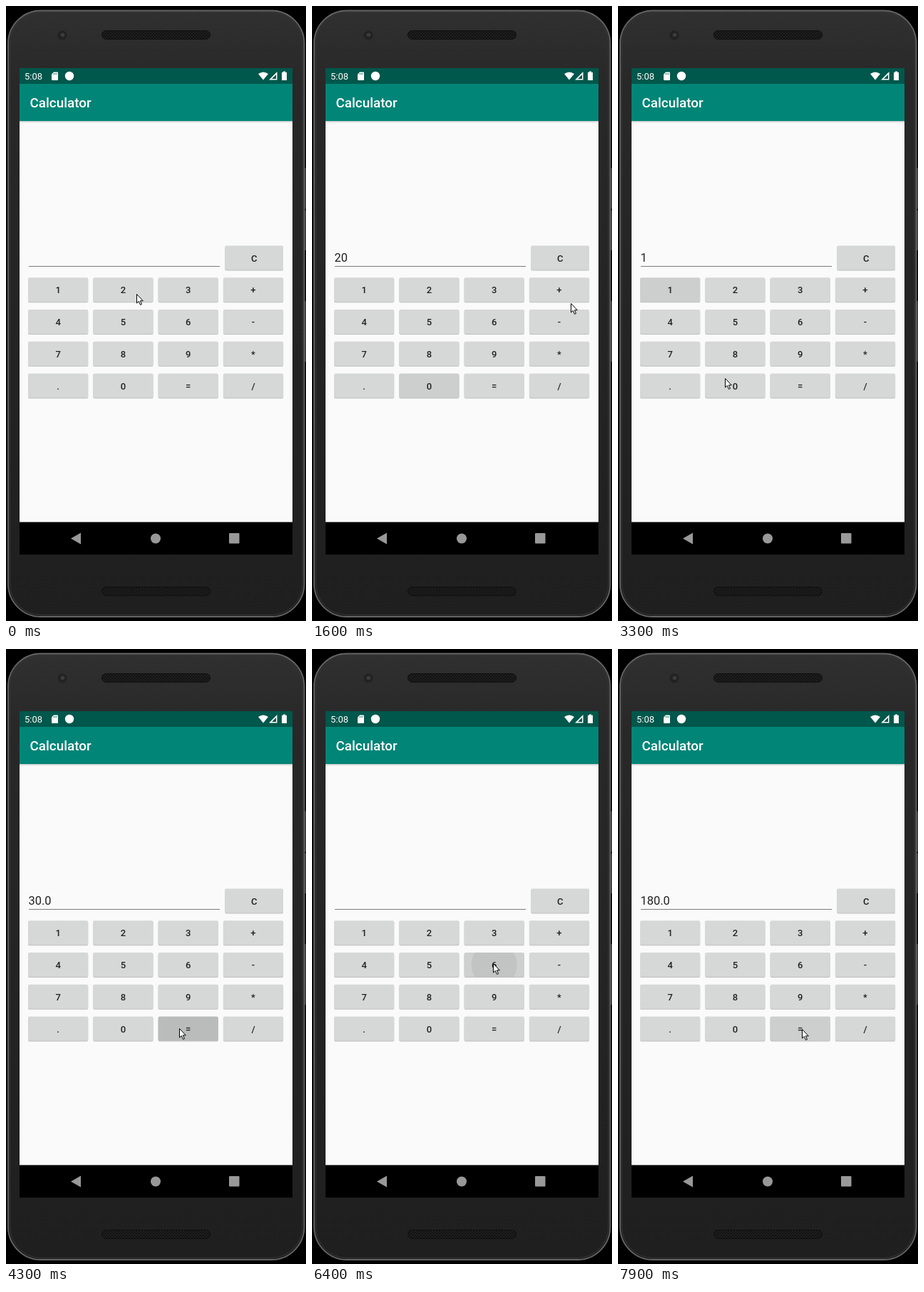
An HTML page for the animation above (8 s loop, 421 by 861 pixels).

```html
<!DOCTYPE html>
<html lang="en">
<head>
<meta charset="utf-8">
<title>Calculator</title>
<style>
  html, body { margin: 0; width: 421px; height: 861px; overflow: hidden; background: #000; }
  svg { display: block; font-family: Roboto, sans-serif; }
  .key { fill: #d6d7d7; filter: drop-shadow(0 1px .7px rgba(0, 0, 0, .24)); }
  .label { font-size: 13px; font-weight: 500; fill: #212121; text-anchor: middle; }
</style>
</head>
<body>
<svg width="421" height="861" viewBox="0 0 421 861">
  <defs>
    <linearGradient id="body" x1="0" y1="0" x2="0" y2="1">
      <stop offset="0" stop-color="#303031"/>
      <stop offset=".12" stop-color="#282829"/>
      <stop offset="1" stop-color="#1f1f20"/>
    </linearGradient>
    <linearGradient id="shade" x1="0" y1="0" x2="0" y2="1">
      <stop offset="0" stop-color="#000" stop-opacity=".2"/>
      <stop offset="1" stop-color="#000" stop-opacity="0"/>
    </linearGradient>
    <pattern id="mesh" width="4" height="4" patternUnits="userSpaceOnUse">
      <rect width="4" height="4" fill="#1f1f20"/>
      <circle cx="1" cy="1" r="1" fill="#0d0d0d"/>
      <circle cx="3" cy="3" r="1" fill="#0d0d0d"/>
    </pattern>
  </defs>

  <!-- phone -->
  <path d="M418 227h3v57h-3zM418 286h3v56h-3zM418 413h3v85h-3z" fill="#3a3a3b"/>
  <rect x="3" y="6.500" width="415.500" height="848.500" rx="46" fill="url(#body)" stroke="#656566" stroke-width="1.800"/>
  <rect x="5.500" y="9" width="410.500" height="843.500" rx="43.500" fill="none" stroke="#363637"/>
  <g fill="url(#mesh)" stroke="#0f0f10">
    <rect x="134.500" y="34.500" width="152" height="12" rx="6"/>
    <rect x="134.500" y="813.500" width="152" height="12" rx="6"/>
  </g>
  <circle cx="79" cy="41" r="6.500" fill="#222223"/>
  <circle cx="79.500" cy="40.500" r="2.800" fill="#3c3c3e"/>

  <!-- app -->
  <rect x="19" y="87" width="383" height="681" fill="#fafafa"/>
  <rect x="19" y="87" width="383" height="22" fill="#00574b"/>
  <rect x="19" y="109" width="383" height="52" fill="#008577"/>
  <rect x="19" y="161" width="383" height="3" fill="url(#shade)"/>
  <g fill="#fff">
    <text x="26" y="103" font-size="13">5:08</text>
    <text x="33.500" y="142" font-size="18.85" font-weight="500">Calculator</text>
    <path d="M67 92.500h5q1 0 1 1v9.500q0 1-1 1h-7q-1 0-1-1v-7.500z"/>
    <circle cx="89" cy="98" r="6.200"/>
    <path d="M354 95q7-5 14 0l-7 8.500z"/>
    <path d="M380.500 92v11.500h-11.500zM379 96l-6 6h6z" fill-rule="evenodd"/>
    <path d="M389 91.500h3v1.300h2v11.200h-7v-11.200h2z"/>
  </g>
  <path d="M67 94v2M69 94v2M71 94v2" stroke="#00574b" stroke-width=".8"/>
  <rect x="32" y="364" width="268" height="1" fill="#7c7c7c"/>
  <text id="display" x="31.500" y="358" font-size="16.4" fill="#212121"></text>
  <g id="keys"></g>

  <!-- navigation -->
  <rect x="19" y="722.500" width="383" height="45.500" fill="#000"/>
  <g fill="#999">
    <path d="M91 745.500l14-8v16z"/>
    <circle cx="210" cy="745.500" r="7"/>
    <rect x="313" y="738" width="14.500" height="14.500" rx="1"/>
  </g>

  <path id="cursor" d="M.5.5v12.500l2.800-2.600 2.200 5 2-.9-2.100-4.700h3.900z"
        fill="#fff" stroke="#000" stroke-linejoin="round"/>
</svg>
<script>
const LOOP = 8000, TICK = 100;
const KEY_H = 34, RIPPLE = 32;

// time in ticks, key
const taps = [
  [6, '2'], [14, '0'], [20, '+'], [31, '1'], [36, '0'],
  [42.5, '='], [53.5, '*'], [64, '6'], [77, '=']
];

// pointer legs: start tick, end tick, x and y reached
const home = { x: 183, y: 403 };
const legs = [
  [0, 2, 177, 400], [7, 9, 175, 524], [15, 16, 363, 416], [16, 18, 345, 398],
  [21, 24, 217, 406], [26, 28, 85, 397], [32, 33, 150, 521], [38, 40, 243, 531],
  [44, 46, 276, 565], [47, 52, 338, 483], [55, 56, 258, 472], [57, 60, 219, 419],
  [60, 62, 254, 440], [65, 68, 258, 540], [69, 70, 258, 532]
];

const $ = id => document.getElementById(id);
const clamp = v => Math.min(1, Math.max(0, v));
const ease = v => v * v * (3 - 2 * v);
const operate = {
  '+': (a, b) => a + b,
  '-': (a, b) => a - b,
  '*': (a, b) => a * b,
  '/': (a, b) => a / b
};
const keys = {};

function add(parent, tag, attrs) {
  const el = document.createElementNS('http://www.w3.org/2000/svg', tag);
  for (const name in attrs) el.setAttribute(name, attrs[name]);
  return parent.appendChild(el);
}

function addKey(label, x, y, w) {
  const g = add($('keys'), 'g', { transform: `translate(${x} ${y})` });
  const box = { width: w, height: KEY_H, rx: 2 };
  const mid = w / 2, dx = Math.sqrt(RIPPLE ** 2 - (KEY_H / 2) ** 2);
  const left = mid - dx, right = mid + dx;
  add(g, 'rect', { ...box, class: 'key' });
  const cover = add(g, 'rect', { ...box, opacity: 0 });
  const drop = add(g, 'path', {
    d: `M${left} 0H${right}A${RIPPLE} ${RIPPLE} 0 0 1 ${right} ${KEY_H}
        H${left}A${RIPPLE} ${RIPPLE} 0 0 1 ${left} 0z`,
    opacity: 0
  });
  add(g, 'text', { x: mid, y: 22.2, class: 'label' }).textContent = label;
  keys[label] = { cover, drop };
}

addKey('C', 307.3, 335.6, 81.7);
[...'123+456-789*.0=/'].forEach((label, i) =>
  addKey(label, 31 + (i % 4) * 91.3, 380.2 + Math.floor(i / 4) * 44.75, 84.2));

function pointerAt(tick) {
  return legs.reduce((p, [from, to, x, y]) => {
    const k = ease(clamp((tick - from) / (to - from)));
    return { x: p.x + (x - p.x) * k, y: p.y + (y - p.y) * k };
  }, home);
}

// A key takes effect half a tick after it is touched.
function displayAt(tick) {
  let shown = '', held = 0, op = '+';
  for (const [time, key] of taps) {
    if (tick < time + .5) break;
    if (key === '=') shown = operate[op](held, +shown).toFixed(1);
    else if (operate[key]) [held, op, shown] = [+shown, key, ''];
    else shown += key;
  }
  return shown;
}

function ripple(age) {
  if (age < 0 || age >= 2.5) return [0, 0];
  if (age < .5) return [.04, .06];
  return [age < 1.5 ? .13 : .045, 0];
}

function draw(tick) {
  const { x, y } = pointerAt(tick);
  $('cursor').setAttribute('transform', `translate(${Math.round(x)} ${Math.round(y)})`);
  $('display').textContent = displayAt(tick);
  for (const label in keys) {
    const tap = taps.filter(([time, key]) => key === label && time <= tick).pop();
    const [cover, drop] = ripple(tap ? tick - tap[0] : -1);
    keys[label].cover.setAttribute('opacity', cover);
    keys[label].drop.setAttribute('opacity', drop);
  }
}

const start = performance.now();
let shown = -1;
function loop() {
  const tick = Math.floor((performance.now() - start) % LOOP / TICK);
  if (tick !== shown) draw(shown = tick);
  requestAnimationFrame(loop);
}
loop();
</script>
</body>
</html>
```
